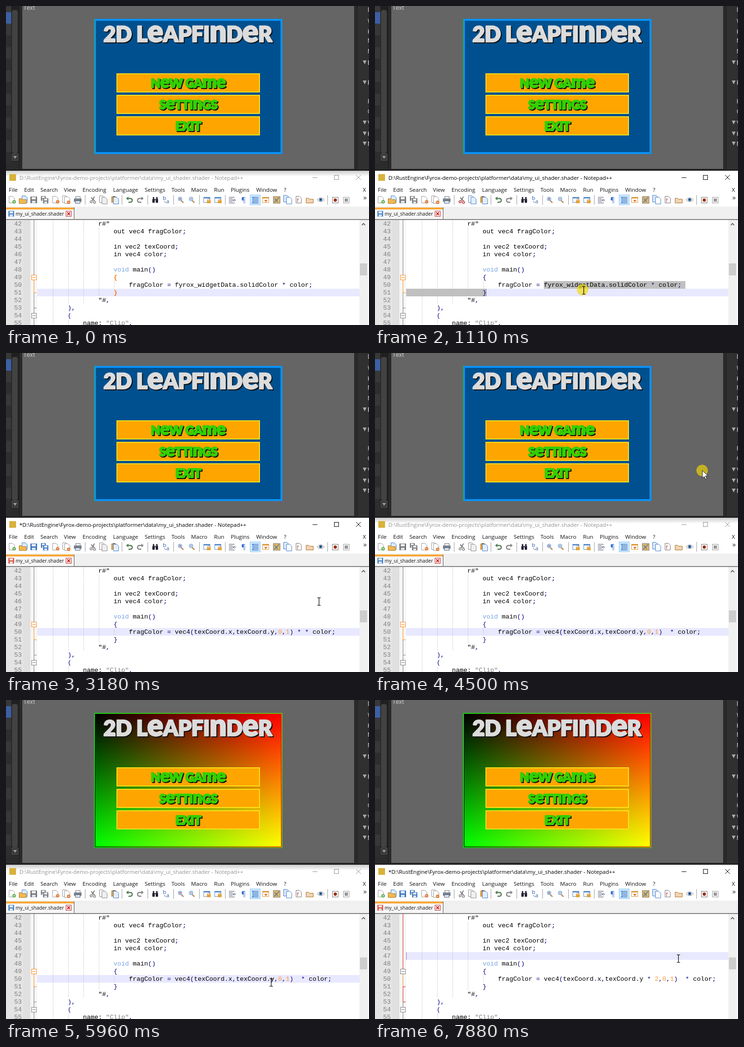
These frames come from a looping animation (759x668 px, 8000 ms). An HTML page:

```html
<!DOCTYPE html>
<html lang="en">
<head>
<meta charset="utf-8">
<title>Shader editing</title>
<style>
html, body { margin: 0; width: 100%; height: 100%; overflow: hidden; background: #2b2b2b; }
svg { display: block; }
text { white-space: pre; }
.ui { font: 11.5px "Open Sans", sans-serif; }
.menu { font-size: 11.6px; }
.tab { font-size: 10.2px; }
.code { font: 13.333px "Liberation Mono", monospace; }
.ed { font: 13px Roboto, sans-serif; }
.game { font-family: Lato, sans-serif; font-weight: 900; text-anchor: middle; stroke-linejoin: round; }
.mix { isolation: isolate; }
.mix rect + rect { mix-blend-mode: screen; }
</style>
</head>
<body>
<svg id="stage" width="759" height="668" viewBox="0 0 759 668">
  <defs>
    <linearGradient id="red"><stop stop-color="#000"/><stop offset="1" stop-color="#f00"/></linearGradient>
    <linearGradient id="green" x2="0" y2="1"><stop stop-color="#000"/><stop offset="1" stop-color="#0f0"/></linearGradient>
    <linearGradient id="rim"><stop stop-color="#12d412"/><stop offset="1" stop-color="#6fb414"/></linearGradient>
    <linearGradient id="shade" x2="0" y2="1"><stop stop-opacity=".2"/><stop offset="1" stop-opacity="0"/></linearGradient>
  </defs>
  <g id="editor"></g>
  <g id="panel"></g>
  <g id="buttons"></g>
  <g id="frame"></g>
  <g id="tools"></g>
  <g id="code"></g>
  <g id="pointer"></g>
</svg>
<script>
const LOOP = 8000, LEFT = 65, CH = 8;
const $ = id => document.getElementById(id);
const rect = (x, y, w, h, fill, more = '') =>
  `<rect x="${x}" y="${y}" width="${w}" height="${h}" fill="${fill}" ${more}/>`;
const box = (x, y, w, h, stroke, fill = 'none') =>
  rect(x + .5, y + .5, w - 1, h - 1, fill, `stroke="${stroke}"`);
const path = (d, stroke, fill = 'none', w = 1) =>
  `<path d="${d}" stroke="${stroke}" fill="${fill}" stroke-width="${w}"/>`;
const dot = (x, y, r, fill, more = '') => `<circle cx="${x}" cy="${y}" r="${r}" fill="${fill}" ${more}/>`;
const esc = s => s.replace(/&/g, '&amp;').replace(/</g, '&lt;');
const text = (x, y, s, cls, fill, more = '') =>
  `<text x="${x}" y="${y}" class="${cls}" fill="${fill}" ${more}>${s}</text>`;
const rowY = n => 448 + (n - 42) * 16;
const colX = c => LEFT + c * CH;

// Scene editor behind the text window

function drawEditor() {
  let s = rect(0, 0, 759, 345, '#2b2b2b') + rect(34, 0, 694, 341, '#656565');
  for (let i = 0; i < 13; i++) s += rect(0, 13 + i * 24.4, 11, 24.4, i % 2 ? '#383838' : '#2e2e2e');
  s += rect(0, 0, 11, 13, '#383838') + rect(0, 13, 11, 24, '#3d5fa3');
  s += rect(11, 0, 16, 325, '#202020') + rect(12.5, 8.5, 12, 300, '#424242', 'rx="4" stroke="#353535"');
  s += box(12, 309, 14, 15, '#555', '#3a3a3a') + path('M15 314h8l-4 6z', 'none', '#999');
  s += rect(27, 0, 1, 342, '#1c1c1c') + rect(33, 0, 1, 342, '#222');
  s += rect(728, 0, 1, 342, '#222') + rect(734, 0, 25, 342, '#303030') + rect(734, 0, 1, 342, '#1c1c1c');
  s += text(36, 8, 'Text', 'ed', '#c4c4c4');
  const labels = [['D', 12], ['W', 36], ['K', 58], ['M', 77], ['N', 99], ['F', 204], ['C', 225]];
  for (const [c, y] of labels) s += text(756, y, c, 'ed', '#c4c4c4');
  const heads = [['E', 118], ['F', 160], ['V', 244], ['H', 267], ['M', 288]];
  for (const [c, y] of heads) s += path(`M746 ${y - 4}h8l-4 8z`, 'none', '#aaa') + text(756, y + 5, c, 'ed', '#d0d0d0');
  $('editor').innerHTML = s + rect(0, 342, 759, 3, '#222');
}

// All letters share the capital height, some keep a small-letter shape
function unicase(x, y, s, size, fill, stroke) {
  const body = [...s].map(c => /[enwm]/.test(c)
    ? `<tspan font-size="${size * 1.4}">${c}</tspan>` : c.toUpperCase()).join('');
  const layer = (d, c) => text(x + d, y + d, body, 'game', c,
    `font-size="${size}" letter-spacing="-.5" stroke="${c}" stroke-width="${stroke}"`);
  return layer(2, '#101010') + layer(0, fill);
}

const mixed = (x, y, w, h) =>
  `<g class="mix">${rect(x, y, w, h, 'url(#red)')}${rect(x, y, w, h, 'url(#green)')}</g>`;

function drawPanel(shaded) {
  $('panel').innerHTML = shaded
    ? rect(184, 27, 394, 283, 'url(#red)') + mixed(187, 30, 388, 277)
      + rect(185, 28, 392, 281, 'none', 'stroke="url(#rim)" stroke-width="2"')
    : rect(184, 27, 394, 283, '#0a93fa') + rect(188, 31, 386, 275, '#00508f') + rect(184, 27, 1, 283, '#16b816');
}

function drawButtons() {
  let s = unicase(380, 75, '2D Leapfinder', 44.6, '#dcdcdc', 2.4);
  ['New Game', 'Settings', 'Exit'].forEach((label, i) => {
    const y = 141 + i * 45;
    s += rect(232, y + 1, 298, 38, '#ffa500', 'stroke="#ffe21a" stroke-width="2"');
    s += unicase(381, y + 30, label, 25.6, '#32d000', 2);
  });
  $('buttons').innerHTML = s;
}

// Text window

function drawFrame() {
  let s = rect(0, 345, 759, 323, '#fff');
  const menu = [['File', 6], ['Edit', 38], ['Search', 72], ['View', 121], ['Encoding', 160], ['Language', 224],
    ['Settings', 290], ['Tools', 346], ['Macro', 387], ['Run', 435], ['Plugins', 470], ['Window', 523], ['?', 581], ['X', 746]];
  for (const [m, x] of menu) s += text(x, 389, m, 'ui menu', '#111');
  s += rect(0, 420, 759, 28, '#f0f0f0') + rect(0, 422, 142, 25, '#f7f7f7') + rect(0, 422, 142, 4, '#faa634');
  s += rect(142, 422, 1, 24, '#555') + rect(0, 446, 759, 1, '#a0a0a0') + rect(0, 447, 759, 1, '#696969');
  s += text(20, 439, 'my_ui_shader.shader', 'ui tab', '#111');
  s += box(125, 429, 12, 12, '#b33', '#fff3f0') + path('M128 432l6 6m0-6l-6 6', '#d02020', 'none', 1.8);
  $('frame').innerHTML = s;
}

const doc = (x, y, c, fill = '#fff') => path(`M${x - 5.5} ${y - 7.5}h7l4 4v10h-11z`, c, fill);
const disk = (x, y, r, c) => rect(x - r, y - r, 2 * r, 2 * r, c, 'rx="1"')
  + rect(x - r * .6, y - r + 1, r * 1.2, r * .7, '#eef2f6') + rect(x - r * .55, y + r * .25, r * 1.1, r * .7, '#dfe6ee');
const folder = (x, y, c) => path(`M${x - 7.5} ${y + 6.5}v-10h5l2 2h8v8z`, '#a8762a', c);
const frameIcon = (x, c) => box(x - 7, 400, 14, 12, c, '#fff') + rect(x - 7, 400, 14, 3, c);
const lines = (x, c, ws) => ws.map((w, i) => rect(x, 400 + i * 3, w, 1, c)).join('');

function drawTools(st) {
  const y = 406, ink = st.active ? '#000' : '#929292';
  const save = st.dirty ? '#3f78c4' : '#777';
  const cut = st.picked ? '#c23b3b' : '#8b8b8b', copy = st.picked ? '#4a7fc8' : '#8b8b8b';
  const star = st.dirty ? '*' : '';
  let s = st.active ? '' : rect(0, 345, 759, 12, 'url(#shade)');
  s += rect(7, 352, 14, 14, '#d9b23c');
  s += text(28, 364, star + 'D:\\RustEngine\\Fyrox-demo-projects\\platformer\\data\\my_ui_shader.shader - Notepad++', 'ui', ink);
  s += rect(641, 359, 10, 1, ink) + box(686, 354, 10, 10, ink) + path('M732 354l10 10m0-10l-10 10', ink);
  s += disk(11, 435, 6, st.dirty ? '#e0523f' : '#4a86c8');
  s += [165, 242, 296, 350, 404, 458, 672].map(x => rect(x, 396, 1, 20, '#9a9a9a')).join('');
  s += doc(12, y, '#999') + dot(17, 410, 3.6, '#4fa33c') + path('M15 410h4m-2-2v4', '#fff');
  s += doc(39, y - 1, '#4a7fc8', '#dbe9fb') + folder(35, 407, '#f3b94e');
  s += disk(58, y, 7, save) + disk(78, 403, 5, save) + disk(83, 408, 5.5, save);
  s += doc(103, y, '#999') + dot(108, 410, 3.6, '#e2742f') + path('M106 410h4', '#fff');
  s += doc(124, 405, '#999') + doc(128, 407, '#999') + dot(131, 411, 3.6, '#e2742f') + path('M129 411h4', '#fff');
  s += rect(146, 399, 9, 5, '#fff', 'stroke="#667"') + rect(142, 403, 16, 7, '#7b8491', 'rx="1"') + rect(145, 408, 10, 5, '#e8f0ff', 'stroke="#456"');
  s += path('M185 399l-5 9m-2-7l7 7', '#777', 'none', 1.8) + dot(178, 410, 2.2, 'none', `stroke="${cut}" stroke-width="1.6"`) + dot(185, 411, 2.2, 'none', `stroke="${cut}" stroke-width="1.6"`);
  s += doc(201, 405, copy) + doc(206, 408, copy, st.picked ? '#e3eefc' : '#eee');
  s += rect(220, 399, 11, 13, '#dba04a', 'rx="1"') + rect(223, 398, 5, 3, '#777') + doc(230, 408, '#4a7fc8', '#e3eefc');
  const hook = (x, k, c) => path(`M${x - 5 * k} 403h${6 * k}q${5 * k} 0 ${5 * k} 4t${-5 * k} 4h${-3 * k}`, c, 'none', 2.4) + path(`M${x - 7 * k} 403l${5 * k} -4v8z`, 'none', c);
  s += hook(258, 1, '#5a7f5a') + hook(281, -1, '#8a8a8a');
  s += rect(306, 404, 5, 8, '#223', 'rx="1"') + rect(313, 404, 5, 8, '#223', 'rx="1"') + rect(307, 400, 3, 5, '#334') + rect(314, 400, 3, 5, '#334') + rect(310, 404, 4, 3, '#556');
  s += text(328, 406, 'b', 'ui', '#2b5fb0', 'font-weight="700"') + text(335, 413, 'a', 'ui', '#2b5fb0', 'font-weight="700"') + path('M331 408q0 4 4 3', '#777');
  for (const [x, c] of [[366, '#c33b3b'], [389, '#e08030']])
    s += path(`M${x} 407l5 5`, '#b8824a', 'none', 2.4) + dot(x - 2, 404, 4, '#bcd9f7', 'stroke="#6f9fd0"') + path(`M${x - 4} 404h4` + (x < 380 ? 'm-2-2v4' : ''), c);
  for (const x of [420, 443]) s += frameIcon(x, '#5c8fce') + rect(x, 407, 8, 6, '#e5a33a') + path(x < 430 ? 'M422 407v-3h4v3' : 'M445 407v-2h4v2', '#b9832f');
  s += lines(466, '#556', [12, 8, 15, 8, 12]) + path('M478 404l-3 3 3 3', '#2b5fb0');
  s += text(492, 411, '¶', 'ui', '#3a6fd0', 'font-weight="700" style="font-size:14px"');
  s += box(510, 395, 22, 22, '#90c8f6', '#cce8ff') + lines(514, '#1c4fa0', [14, 14, 14, 14, 14]) + rect(514, 401, 4, 11, '#cce8ff') + path('M516.5 400v13', '#2b6fd0', 'none', 1.4);
  s += frameIcon(543, '#dd9a3a') + path('M540 406h7l-4 5z', 'none', '#e07a2f');
  s += rect(559, 399, 14, 14, '#e2b565', 'stroke="#777"') + path('M561 411l10-10m-9 2l6 7', '#4a78a8', 'none', 1.6);
  s += doc(586, 404, '#4a7fc8', '#dbe9fb') + doc(592, 408, '#4a7fc8');
  s += doc(612, y, '#777') + text(608, 411, 'f', 'ui', '#b3302a', 'font-style="italic" font-weight="700"');
  s += folder(635, y, '#f1d2b4');
  s += path('M650 406q8 -9 16 0q-8 8 -16 0z', '#a9a39a', '#fbf4e8') + dot(658, 405.5, 3.6, '#4f86c6') + dot(658, 405.5, 1.5, '#123');
  s += box(682, 400, 13, 13, '#777', '#fff') + dot(688.5, 406.5, 3.4, '#9c2f16');
  s += box(705, 400, 13, 13, '#999', '#fff') + rect(708, 403, 7, 7, '#999');
  s += text(747, 406, '»', 'ui', '#333', 'style="font-size:15px"');
  $('tools').innerHTML = s;
}

const listing = { 42: [16, 'r#"'], 43: [20, 'out vec4 fragColor;'], 45: [20, 'in vec2 texCoord;'], 46: [20, 'in vec4 color;'],
  48: [20, 'void main()'], 49: [20, '{'], 51: [20, '}'], 52: [16, '"#,'], 53: [8, '),'], 54: [8, '('], 55: [12, 'name: "Clip",'] };

const paint = (s, brace) => esc(s).replace(/\bvoid\b|"Clip"|\b\d\b|[{}();,.*=]/g, m => {
  if (brace && /[{}]/.test(m)) return `<tspan fill="#f07818" font-weight="700">${m}</tspan>`;
  const c = m === 'void' ? '#78a4e4' : /\d/.test(m) ? '#f99a38' : m === '"Clip"' ? '#808080' : '#000080';
  return `<tspan fill="${c}">${m}</tspan>`;
});

function guide(col, from, to) {
  return `<path d="M${colX(col) + 1.5} ${rowY(from)}V${rowY(to + 1)}" stroke="#bcbcbc" stroke-dasharray="1 1"/>`;
}

function foldMarks(outer) {
  const grey = '#808080', hot = outer ? '#e02010' : '#ff8a1c';
  const v = (a, b, c) => rect(58, a, 1, b - a, c);
  const knob = (y, c) => box(53, y - 5, 11, 11, c, '#fff') + rect(55, y, 7, 1, c);
  const outerInk = outer ? hot : grey;
  return v(448, 632, outerInk) + v(632, 668, grey) + rect(58, 632, 6, 1, outerInk)
    + v(568, 600, outer ? '#f0882a' : hot) + rect(58, 600, 6, 1, hot)
    + knob(568, outer ? grey : hot) + knob(648, grey);
}

function drawCode(st) {
  let s = rect(0, 448, 36, 220, '#e4e4e4') + rect(36, 448, 15, 220, '#e0e0e0') + rect(51, 448, 14, 220, '#f6f6f6');
  s += rect(LEFT, rowY(st.row), 674, 16, '#e8e8ff');
  if (st.picked) {
    if (st.row === 51) s += rect(353, 576, 296, 16, '#c0c0c0') + rect(LEFT, 592, 168, 16, '#c0c0c0');
    else s += rect(353, 576, Math.max(0, colX(st.col) - 353), 16, '#c0c0c0');
  }
  s += guide(4, 42, 55) + guide(8, 42, 52) + guide(8, 55, 55) + guide(12, 42, 52) + guide(16, 43, 51) + guide(20, 50, 50);
  s += foldMarks(st.row === 47);
  for (let n = 42; n < 56; n++) {
    const [col, line] = n === 50 ? [24, st.line] : listing[n] || [0, ''];
    s += text(17, rowY(n) + 12, n, 'code', '#808080') + text(colX(col), rowY(n) + 12, paint(line, st.brace), 'code', '#000');
  }
  if (st.caret) s += rect(Math.max(LEFT, colX(st.col) - 1), rowY(st.row), 1, 16, '#8878b8');
  s += rect(739, 448, 18, 220, '#f0f0f0') + rect(740, 539, 15, 25, '#cdcdcd') + path('M744 459l3.5-3.5 3.5 3.5', '#505050', 'none', 1.6);
  $('code').innerHTML = s;
}

// Timeline

const track = [[130, 653, 656], [650, 357, 584], [920, 357, 584], [1110, 434, 594], [1450, 548, 588], [1710, 573, 582],
  [2510, 573, 582], [2770, 570, 556], [3050, 570, 556], [3180, 652, 519], [4230, 652, 519], [4430, 684, 246],
  [5100, 684, 246], [5760, 552, 590], [6430, 552, 590], [6820, 588, 613], [7550, 588, 613], [7750, 632, 540]];
const within = (t, spans) => spans.some(([a, b]) => t >= a && t < b);

function hotspot(t) {
  const i = track.findIndex(k => k[0] > t);
  if (i < 0) return track[track.length - 1].slice(1);
  if (!i) return null;
  const [t0, x0, y0] = track[i - 1], [t1, x1, y1] = track[i];
  const u = (t - t0) / (t1 - t0), e = u * u * (3 - 2 * u);
  return [x0 + (x1 - x0) * e, y0 + (y1 - y0) * e];
}

function lineText(t) {
  if (t < 2110) return 'fragColor = fyrox_widgetData.solidColor * color;';
  const typed = t < 6430 ? '' : t < 7020 ? ' ' : t < 7150 ? ' * ' : ' * 2';
  return `fragColor = vec4(texCoord.x,texCoord.y${typed},0,1) ${t < 3380 ? '* ' : ' '}* color;`;
}

function caretAt(t, p) {
  if (t < 920) return [51, 21];
  if (t < 2110) return p[1] >= 592 ? [51, 21] : [50, Math.min(72, Math.floor((p[0] - LEFT) / CH))];
  if (t < 3380) return [50, 69];
  if (t < 6030) return [50, 68];
  if (t < 7750) return [50, t < 6430 ? 62 : t < 7020 ? 63 : t < 7150 ? 65 : 66];
  return [47, 0];
}

function drawPointer(p, pressed) {
  if (!p) return '';
  const [x, y] = p.map(Math.round);
  const ring = pressed ? dot(x, y, 12, '#f5dc00', 'fill-opacity=".65"') : '';
  if (y > 447) return ring + path(`M${x - 1} ${y - 6.5}h2.5l1 1 1-1h2.5M${x - 1} ${y + 9.5}h2.5l1-1 1 1h2.5M${x + 2.5} ${y - 6}v15`, '#000', 'none', 1.2);
  return ring + path(`M${x + .5} ${y}v16l4-3.6 2.6 6 2.6-1.2-2.6-5.8h5z`, '#222', '#fff');
}

let lastShaded, lastTools, lastCode;
function render(t) {
  const p = hotspot(t), [row, col] = caretAt(t, p);
  const st = {
    row, col, line: lineText(t), brace: t < 920,
    active: within(t, [[920, 4500], [6030, LOOP]]),
    dirty: within(t, [[2110, 3840], [6430, LOOP]]),
    picked: within(t, [[920, 2110]]),
    caret: within(t, [[920, 1980], [2110, 2640], [3380, 4040], [6030, 6960], [7020, 7680], [7750, LOOP]])
  };
  const shaded = t >= 4570;
  if (shaded !== lastShaded) drawPanel(lastShaded = shaded);
  const toolKey = [st.active, st.dirty, st.picked].join();
  if (toolKey !== lastTools) { lastTools = toolKey; drawTools(st); }
  const codeKey = JSON.stringify(st);
  if (codeKey !== lastCode) { lastCode = codeKey; drawCode(st); }
  $('pointer').innerHTML = drawPointer(p, within(t, [[920, 1780], [4430, 4630], [6030, 6230], [7750, 7820]]));
}

drawEditor();
drawButtons();
drawFrame();
render(0);
const start = performance.now();
function tick() {
  render((performance.now() - start) % LOOP);
  requestAnimationFrame(tick);
}
requestAnimationFrame(tick);
</script>
</body>
</html>
```
